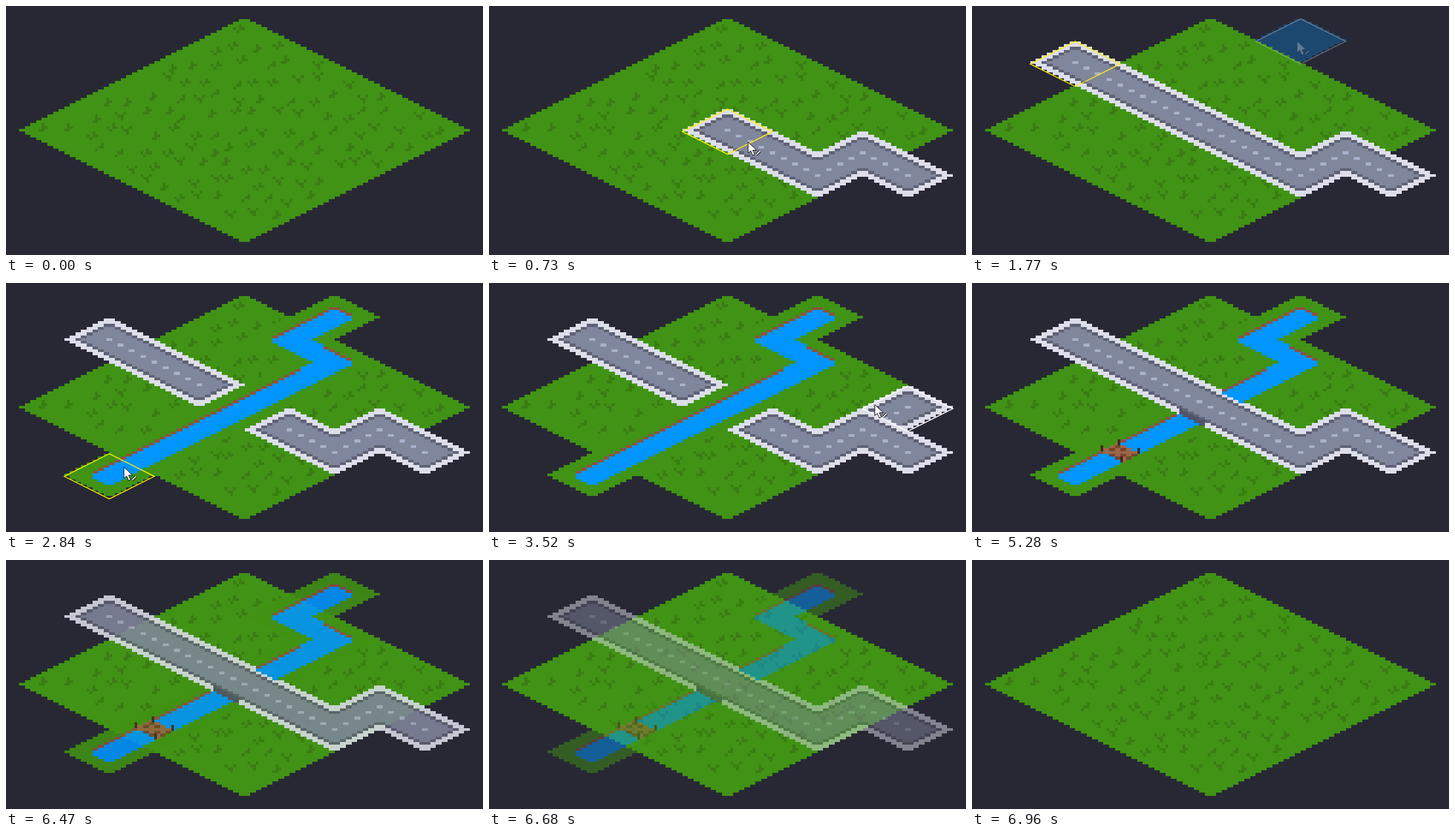
An HTML page with a canvas that plays this animation: 727x379 px, repeating every 7.52 s.

```html
<!DOCTYPE html>
<html lang="en">
<head>
<meta charset="utf-8">
<title>Isometric tile painter</title>
<style>
  html, body { margin: 0; width: 100%; height: 100%; overflow: hidden; background: #282835; }
  canvas { display: block; }
</style>
</head>
<body>
<canvas id="stage" width="727" height="379"></canvas>
<script>
const LOOP = 7520;
const SCALE = 687 / 160;
const LEFT = 20, TOP = 19.5;
const COLORS = {
  back: '#282835', grass: '#409314', tuft: '#3a7d13',
  kerb: '#dcdeea', gutter: '#5f6274', asphalt: '#80869c', dash: '#a9b1cb', shadow: '#50536a',
  water: '#0095ff', bank: '#8b543e',
  plank: '#9c6647', seam: '#73462f', post: '#43291f'
};

const stage = document.getElementById('stage').getContext('2d');
const makeLayer = () => Object.assign(document.createElement('canvas'), { width: 160, height: 80 }).getContext('2d');
const ground = makeLayer(), paint = makeLayer(), preview = makeLayer();

const clamp = v => Math.max(0, Math.min(1, v));
const key = (i, j) => i + ',' + j;

// Edge order: upper right, lower right, lower left, upper left.
const NEIGHBOURS = [[0, -1], [1, 0], [0, 1], [-1, 0]];
const JOINS = {
  road: ['road', 'bridge'],
  bridge: ['road', 'bridge'],
  water: ['water', 'bridge', 'wood'],
  wood: ['water', 'bridge', 'wood']
};

const TUFT_SHAPES = [
  ['..#', '.##', '#..'],
  ['.#.', '.##', '##.'],
  ['#..#', '.##.', '..#.'],
  ['..#.', '#.##', '.#..']
];

function roadColor(dx, dy, d, dist, open, bridge) {
  if (bridge && d[2] < 2 && dx > -11 && dx < -2) return COLORS.shadow;
  if (bridge && d[0] < 1 && dx > 4 && dx < 12) return COLORS.water;
  if (dist < 2) return COLORS.kerb;
  if (dist < 3) return COLORS.gutter;
  const step = Math.abs(dy) / 2;
  if (step <= 2 && step % 1 === 0) {
    const onDash = side => Math.abs(dx - side * 4 * step) < 1;
    if (step === 0) return onDash(0) ? COLORS.dash : COLORS.asphalt;
    const right = dy < 0 ? open[0] : open[1];
    const left = dy < 0 ? open[3] : open[2];
    if (right && onDash(1) || left && onDash(-1)) return COLORS.dash;
  }
  return COLORS.asphalt;
}

function waterColor(dx, dy, d, dist, open) {
  if (!open.includes(true)) return COLORS.water;
  const blunt = dx < -6 && !open[2] && !open[3] || dx > 6 && !open[0] && !open[1];
  if (dist < 4 || blunt) return COLORS.grass;
  const farBank = Math.min(open[0] ? 99 : d[0], open[3] ? 99 : d[3]);
  return farBank < 5 ? COLORS.bank : COLORS.water;
}

function woodColor(dx, dy) {
  const posts = [[-6.5, -1], [-.5, -3], [6.5, 0], [.5, 3]];
  if (posts.some(([x, y]) => dx === x && (dy === y || dy === y - 1))) return COLORS.post;
  const across = dx / 2 + dy, along = dy - dx / 2;
  if (Math.abs(across) >= 4 || Math.abs(along) >= 3) return null;
  const row = Math.floor(across + 4);
  return row % 2 && (Math.floor(along + 3) + row) % 3 ? COLORS.seam : COLORS.plank;
}

function drawTile(layer, i, j, kind, open) {
  const left = 64 + 16 * (i - j), top = 8 * (i + j);
  for (let y = 0; y < 15; y++) {
    for (let x = 0; x < 32; x++) {
      const dx = x - 15.5, dy = y - 7;
      if (Math.abs(dx) / 2 + Math.abs(dy) > 8) continue;
      let color = COLORS.grass;
      if (kind !== 'grass') {
        const d = [8 - dx / 2 + dy, 8 - dx / 2 - dy, 8 + dx / 2 - dy, 8 + dx / 2 + dy];
        // A closed edge has a border; two open edges leave a corner piece.
        const dist = Math.min(...d.map((v, k) => {
          const next = (k + 1) % 4;
          return !open[k] ? v : open[next] ? Math.max(v, d[next]) : 99;
        }));
        if (kind === 'road' || kind === 'bridge') {
          color = roadColor(dx, dy, d, dist, open, kind === 'bridge');
        } else {
          color = kind === 'wood' && woodColor(dx, dy) || waterColor(dx, dy, d, dist, open);
        }
      }
      layer.fillStyle = color;
      layer.fillRect(left + x, top + y, 1, 1);
    }
  }
}

function drawTufts() {
  let seed = 11;
  const random = n => {
    seed = (seed * 16807) % 2147483647;
    return Math.floor(seed / 2147483647 * n);
  };
  ground.fillStyle = COLORS.tuft;
  for (let row = 0; row < 13; row++) {
    for (let col = 0; col < 21; col++) {
      const x = col * 8 + (row % 2) * 4 - 4 + random(5), y = row * 6 + 1 + random(4);
      const shape = TUFT_SHAPES[random(TUFT_SHAPES.length)];
      if (Math.abs(x + 2 - 80) / 2 + Math.abs(y + 1 - 39) > 37) continue;
      shape.forEach((line, dy) => [...line].forEach((c, dx) => {
        if (c === '#') ground.fillRect(x + dx, y + dy, 1, 1);
      }));
    }
  }
}

for (let i = 0; i < 5; i++) {
  for (let j = 0; j < 5; j++) drawTile(ground, i, j, 'grass');
}
drawTufts();

// Keys are [time, i, j] of the pointer in tile units.
const STROKES = [
  { tool: 'road', from: 90, shown: 300, press: 300, hide: 1400, to: 1610, hold: 1800,
    keys: [[90, 5, 1], [370, 5, 1], [480, 4, 1], [590, 4, 2], [910, .5, 2], [1150, -1, 2]] },
  { tool: 'water', from: 1705, shown: 1930, press: 1970, hide: 2970, to: 3140,
    keys: [[1700, .95, -.95], [2000, 1, -1], [2140, 1, 0], [2170, 1.4, 0], [2210, 1.6, 0],
           [2270, 2, .2], [2840, 1.96, 4.63], [2960, 2, 5]] },
  { tool: 'road', from: 3280, shown: 3480, press: 3890, hide: 4030, to: 4030,
    keys: [[3280, 4, 0], [3450, 4, 0], [3760, 2, 1.2], [3880, 2, 2]] },
  { tool: 'wood', from: 4030, shown: 4030, press: 4530, hide: 4820, to: 5070,
    keys: [[4030, 2, 2], [4320, 1.76, 3.14], [4520, 2, 4]] }
];

function pointerAt(stroke, t) {
  const keys = stroke.keys;
  const n = keys.findIndex(k => k[0] > t);
  if (n <= 0) return (n ? keys[keys.length - 1] : keys[0]).slice(1);
  const [a, b] = [keys[n - 1], keys[n]];
  const f = (t - a[0]) / (b[0] - a[0]);
  return [a[1] + (b[1] - a[1]) * f, a[2] + (b[2] - a[2]) * f];
}

function resultOf(tool, current) {
  const wet = current === 'water' || current === 'wood' || current === 'bridge';
  if (tool === 'road') return wet ? 'bridge' : 'road';
  if (tool === 'wood') return current === 'water' ? 'wood' : current;
  return tool;
}

const stamps = [];
for (const stroke of STROKES) {
  let last = '';
  for (let t = stroke.press; t < stroke.hide; t += 5) {
    const [i, j] = pointerAt(stroke, t).map(Math.round);
    if (key(i, j) !== last) stamps.push({ t, i, j, tool: stroke.tool });
    last = key(i, j);
  }
}

function cellsAt(t) {
  const cells = new Map();
  for (const s of stamps) {
    if (s.t > t) break;
    const k = key(s.i, s.j), old = cells.get(k);
    cells.set(k, { i: s.i, j: s.j, kind: resultOf(s.tool, old && old.kind) });
  }
  return cells;
}

function openEdges(cells, i, j, kind) {
  return NEIGHBOURS.map(([di, dj]) => {
    const cell = cells.get(key(i + di, j + dj));
    return !!cell && JOINS[kind].includes(cell.kind);
  });
}

const toStage = (i, j) => [LEFT + SCALE * (80 + 16 * (i - j)), TOP + SCALE * (8 + 8 * (i + j))];

function blit(layer, alpha) {
  stage.globalAlpha = alpha;
  stage.imageSmoothingEnabled = false;
  stage.drawImage(layer.canvas, LEFT, TOP, 160 * SCALE, 80 * SCALE);
  stage.globalAlpha = 1;
}

function polygon(points, close = true) {
  stage.beginPath();
  points.forEach(([x, y]) => stage.lineTo(x, y));
  if (close) stage.closePath();
}

function drawOutline(i, j, color, alpha) {
  const [x, y] = toStage(i, j), w = 16 * SCALE, h = 8 * SCALE;
  stage.globalAlpha = alpha;
  polygon([[x, y - h], [x + w, y], [x, y + h], [x - w, y]]);
  stage.strokeStyle = color;
  stage.lineWidth = 1.4;
  stage.stroke();
  stage.globalAlpha = 1;
}

function drawCursor(x, y, alpha) {
  stage.save();
  stage.translate(x, y);
  stage.globalAlpha = alpha;
  polygon([[0, 0], [0, 17], [4, 13.5], [7, 20.5], [10, 19], [7, 12.5], [13, 12.5]]);
  stage.fillStyle = '#fff';
  stage.fill();
  stage.strokeStyle = '#111';
  stage.lineWidth = 1;
  stage.stroke();
  for (const [color, width] of [['#111', 4], ['#fff', 1.8]]) {
    polygon([[12.5, 19.5], [18, 14]], false);
    stage.strokeStyle = color;
    stage.lineWidth = width;
    stage.stroke();
  }
  stage.restore();
}

function drawStroke(stroke, cells, t) {
  const end = Math.max(stroke.to, stroke.hold || 0);
  if (t < stroke.from || t >= end) return;
  const ramp = (a, b) => b > a ? clamp((t - a) / (b - a)) : +(t >= a);
  const alpha = ramp(stroke.from, stroke.shown) * (1 - ramp(stroke.hide, stroke.to));
  const [pi, pj] = pointerAt(stroke, t);
  const i = Math.round(pi), j = Math.round(pj);
  const pressed = t >= stroke.press;

  if (!pressed) {
    const cell = cells.get(key(i, j));
    const kind = resultOf(stroke.tool, cell && cell.kind);
    if (kind) {
      preview.clearRect(0, 0, 160, 80);
      drawTile(preview, i, j, kind, openEdges(cells, i, j, kind));
      blit(preview, alpha);
    }
  }
  drawOutline(i, j, pressed ? '#ffee00' : '#fff', stroke.hold && pressed ? 1 : alpha);
  if (alpha > 0) drawCursor(...toStage(pi, pj), alpha);
}

function draw(t) {
  stage.fillStyle = COLORS.back;
  stage.fillRect(0, 0, 727, 379);
  blit(ground, 1);

  const cells = cellsAt(t);
  paint.clearRect(0, 0, 160, 80);
  for (const { i, j, kind } of cells.values()) {
    drawTile(paint, i, j, kind, openEdges(cells, i, j, kind));
  }
  blit(paint, 1 - clamp((t - 6400) / 560));
  for (const stroke of STROKES) drawStroke(stroke, cells, t);
}

const start = performance.now();
function frame() {
  draw((performance.now() - start) % LOOP);
  requestAnimationFrame(frame);
}
frame();
</script>
</body>
</html>
```
